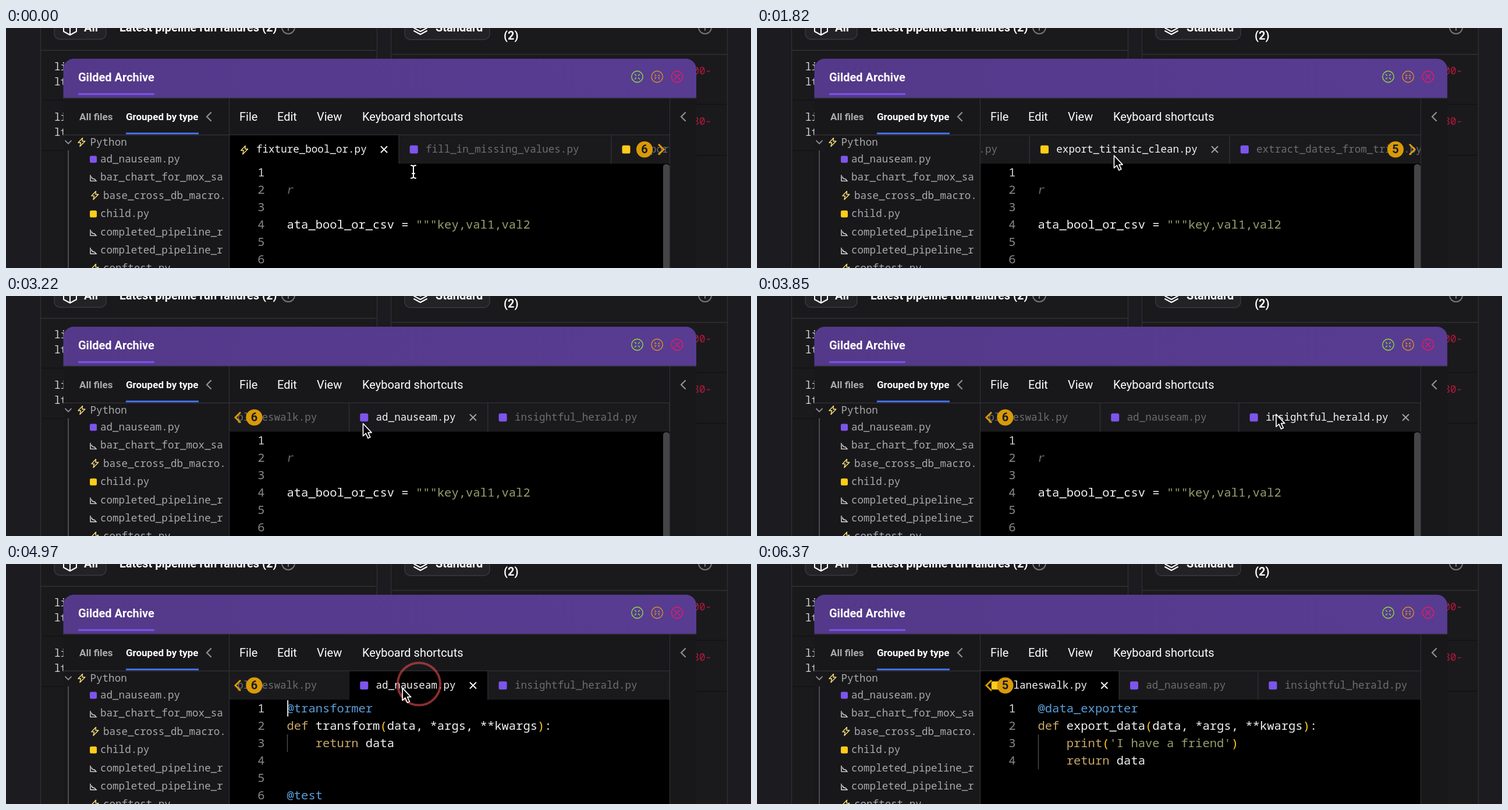
Recreate the animation shown at these times as an HTML page. Size 1280 px wide and 414 px high, loop 6.44 s.

```html
<!DOCTYPE html>
<html lang="en">
<head>
<meta charset="utf-8">
<title>Editor tabs</title>
<style>
html, body { margin: 0; width: 100%; height: 100%; overflow: hidden; background: #1b1b20; }
svg { display: block; width: 1280px; height: 414px; }
text { font-family: Roboto, sans-serif; font-size: 20px; fill: #fff; white-space: pre; }
.b { font-weight: 700; }
.m { font-family: "Noto Sans Mono", monospace; font-size: 17.57px; }
.code { font-family: "Noto Sans Mono", monospace; font-size: 20.5px; }
.line { fill: none; stroke: #303035; stroke-width: 1.3; }
.ico { fill: none; stroke-width: 1.4; stroke-linejoin: round; stroke-linecap: round; }
</style>
</head>
<body>
<svg id="stage" viewBox="0 0 1280 414">
  <defs>
    <clipPath id="bar"><rect x="384" y="185" width="756" height="49"/></clipPath>
    <clipPath id="side"><rect x="98" y="185" width="285" height="229"/></clipPath>
    <linearGradient id="head"><stop stop-color="#54398a"/><stop offset="1" stop-color="#583c92"/></linearGradient>
    <path id="bolt" class="ico" stroke="#ffe27a" d="M8.500 .8L1 8.800H5.500L4 15.200L12.800 6.200H8Z"/>
    <path id="chart" class="ico" stroke="#e4e4e6" d="M1 2V12H11.500M3 5Q4 8.500 6 8.500Q8.500 8 10 11"/>
  </defs>

  <rect width="1280" height="414" fill="#1b1b20"/>
  <g fill="#1a1a1d" stroke="#303035" stroke-width="1.3">
    <rect x="59.5" y="-20" width="578" height="460"/>
    <rect x="661.5" y="-20" width="578" height="460"/>
    <path d="M60 38.5H637M662 45.5H1239"/>
    <path d="M62 124.5H100M62 211.5H100M1186 131.5H1238M1186 219.5H1238" stroke="#111113"/>
    <rect x="83" y="-25" width="89" height="44.5" rx="10" fill="#232327" stroke="#3a3a3f"/>
    <rect x="685" y="-25" width="146" height="45" rx="10" fill="#232327" stroke="#3a3a3f"/>
  </g>
  <g class="ico" stroke="#fff" style="stroke-width:2">
    <path d="M110 -12L121 -6V6L110 12L99 6V-6ZM110 12V0M99 -6L110 0L121 -6"/>
    <path d="M712 -12L723 -6L712 0L701 -6ZM701 0L712 6L723 0M701 5L712 11L723 5"/>
    <g stroke="#77777b"><circle cx="485" cy="-1" r="11"/><path d="M485 -2V4"/><circle cx="1201" cy="-1" r="11"/><path d="M1201 -2V4"/></g>
  </g>
  <text class="b" x="134" y="6">All</text>
  <text class="b" x="195" y="6">Latest pipeline run failures (2)</text>
  <text class="b" x="738" y="6">Standard</text>
  <text class="b" x="855" y="20">(2)</text>
  <g id="rows"></g>

  <path d="M98.500 414V71Q98.500 53 116.500 53H1168Q1186 53 1186 71V414Z" fill="#18181b"/>
  <path d="M98.500 121V71A18 18 0 0 1 116.500 53H1168A18 18 0 0 1 1186 71V121Z" fill="url(#head)"/>
  <text class="b" x="124" y="91.500">Gilded Archive</text>
  <rect x="124" y="112.500" width="131" height="3" rx="1" fill="#7d55ec"/>
  <g class="ico">
    <g stroke="#8fdc3c"><circle cx="1084.500" cy="84" r="9.700"/><path d="M1080.500 80L1082.500 82M1088.500 80L1086.500 82M1080.500 88L1082.500 86M1088.500 88L1086.500 86"/></g>
    <g stroke="#d3922a"><circle cx="1118.700" cy="84" r="9.700"/><path d="M1115 80L1117 82.500H1114.500M1122.500 80L1120.500 82.500H1123M1115 88L1117 85.500H1114.500M1122.500 88L1120.500 85.500H1123" stroke-width="1.200"/></g>
    <g stroke="#f0195f"><circle cx="1153" cy="84" r="9.700"/><path d="M1149 80L1157 88M1157 80L1149 88"/></g>
  </g>
  <path class="line" d="M98 121H1186M98 184.500H384M384 184.500H1140"/>
  <text class="b" x="126" y="158.600" style="font-size:17px;fill:#aaaaad">All files</text>
  <text class="b" x="206" y="158.600" style="font-size:17px">Grouped by type</text>
  <rect x="206" y="180.500" width="125" height="2.800" fill="#4877ff"/>
  <g class="ico" stroke="#8c8c90" style="stroke-width:2.400">
    <path d="M352 146L345 153L352 160M1167 146L1160 153L1167 160"/>
    <path d="M102 194.500L107 199.500L112 194.500" style="stroke-width:1.800"/>
  </g>
  <text x="401" y="160">File</text>
  <text x="466" y="160">Edit</text>
  <text x="534" y="160">View</text>
  <text x="612" y="160">Keyboard shortcuts</text>
  <g id="tree" clip-path="url(#side)"></g>

  <rect x="384" y="185" width="756" height="49" fill="#1a1a1d"/>
  <rect x="384" y="234" width="756" height="180" fill="#000"/>
  <g id="tabs" clip-path="url(#bar)"></g>
  <g id="badge">
    <path id="arrow" class="ico" stroke="#d99a08" style="stroke-width:3;stroke-linecap:butt;stroke-linejoin:miter"/>
    <circle id="disc" cy="209.500" r="14" fill="#d99a08"/>
    <text id="count" class="b" y="216" text-anchor="middle" style="fill:#1b1b1e">6</text>
  </g>
  <g id="docs"></g>
  <path class="line" d="M383.500 121V414M1140.500 121V414"/>
  <circle id="ring" fill="none" stroke="#d9484c" stroke-width="4"/>
  <g id="pointer">
    <path id="hand" d="M0 0V21.500L4.800 17L8.600 25.300L12.300 23.600L8.600 15.600H14.600Z" fill="#000" stroke="#fff" stroke-width="1.700" stroke-linejoin="round"/>
    <g id="beam" fill="none" stroke-linecap="round">
      <path d="M-4 -11Q0 -11 0 -8Q0 -11 4 -11M0 -8V8M-4 11Q0 11 0 8Q0 11 4 11M-2 3H2" stroke="#000" stroke-width="4.500"/>
      <path d="M-4 -11Q0 -11 0 -8Q0 -11 4 -11M0 -8V8M-4 11Q0 11 0 8Q0 11 4 11M-2 3H2" stroke="#fff" stroke-width="2"/>
    </g>
  </g>
</svg>
<script>
const LOOP = 6440, LEFT = 384, VIEW = 756, CH = 10.54;
const PURPLE = '#7d55ec', YELLOW = '#ffcc19', BLUE = '#4877ff';
const $ = id => document.getElementById(id);

function add(parent, tag, attrs = {}, text) {
  const el = document.createElementNS('http://www.w3.org/2000/svg', tag);
  for (const k in attrs) el.setAttribute(k, attrs[k]);
  if (text != null) el.textContent = text;
  return parent.appendChild(el);
}

function icon(parent, kind, x, y, size) {
  if (kind[0] === '#')
    return add(parent, 'rect', { x, y, width: size, height: size, rx: 2.5, fill: kind });
  return add(parent, 'use', { href: '#' + kind, x, y });
}

// Log rows behind the window
const rows = $('rows');
[['li', 73], ['lt', 98.5], ['li', 160], ['lt', 185.5]].forEach(([s, y]) =>
  add(rows, 'text', { class: 'm', x: 83, y, style: 'fill:#d8d8da' }, s));
[['00-', 80], ['80-', 167]].forEach(([s, y]) =>
  add(rows, 'text', { class: 'm', x: 1212, y, 'text-anchor': 'end', style: 'fill:#b8183c' }, s));

// File tree
const tree = $('tree');
add(tree, 'path', { class: 'line', d: 'M107 211V414', style: 'stroke:#6a6a6e' });
icon(tree, 'bolt', 123, 189);
const label = (x, y, s) => add(tree, 'text', { class: 'm', x, y, style: 'fill:#a9a9ac' }, s);
label(144.5, 203, 'Python');
[
  [PURPLE, 'ad_nauseam.py'], ['chart', 'bar_chart_for_mox_sa'], ['bolt', 'base_cross_db_macro.'],
  [YELLOW, 'child.py'], ['chart', 'completed_pipeline_r'], ['chart', 'completed_pipeline_r'],
  ['bolt', 'conftest.py']
].forEach(([kind, name], i) => {
  const y = 232 + 31.4 * i, bolt = kind === 'bolt';
  icon(tree, kind, bolt ? 146 : 144, y - (bolt ? 14 : 11.5), 12);
  label(bolt ? 167 : 162, y, name);
});

// Tabs
let edge = 0;
const tabs = [
  ['fixture_bool_or.py', 'bolt'], ['fill_in_missing_values.py', PURPLE],
  ['export_titanic_clean.py', YELLOW], ['extract_dates_from_trips.py', PURPLE],
  ['dynamic_parent.py', BLUE], ['planeswalk.py', YELLOW],
  ['ad_nauseam.py', PURPLE], ['insightful_herald.py', PURPLE]
].map(([name, kind]) => {
  const width = name.length * CH + 101.3, start = edge;
  edge += width;
  const g = add($('tabs'), 'g');
  const fill = add(g, 'rect', { y: 185, width, height: 49 });
  const rule = add(g, 'path', { class: 'line', d: `M0 185V234M${width} 185V234` });
  icon(g, kind, 18.7, 202.5, 14);
  const text = add(g, 'text', { class: 'm', x: 46, y: 215 }, name);
  const cross = add(g, 'path', {
    class: 'ico', style: 'stroke-width:1.8',
    d: `M${width - 30.5} 204.5l10 10m0 -10l-10 10`
  });
  return { start, end: edge, g, fill, rule, text, cross };
});
const MAX = edge - VIEW;

// Code documents: each line is a list of [colour, text]
const W = '#f2f2f2', D = '#c9a868', P = '#ffcb2b', A = '#5a9fdb', S = '#9b9e6c';
const sources = [
  [[], [['#6b6b6e', 'r']], [], [[W, 'ata_bool_or_csv = '], [S, '"""key,val1,val2']], [], []],
  [[[A, '@transformer']],
   [[D, 'def '], [W, 'transform'], [P, '('], [W, 'data, *args, **kwargs'], [P, ')'], [W, ':']],
   [[D, '    return '], [W, 'data']], [], [], [[A, '@test']]],
  [[[A, '@data_exporter']],
   [[D, 'def '], [W, 'export_data'], [P, '('], [W, 'data, *args, **kwargs'], [P, ')'], [W, ':']],
   [[D, '    print'], [P, '('], [S, "'I have a friend'"], [P, ')']],
   [[D, '    return '], [W, 'data']]]
];
const docs = sources.map((lines, n) => {
  const g = add($('docs'), 'g');
  lines.forEach((parts, i) => {
    const y = 256 + 30 * i;
    add(g, 'text', { class: 'code', x: 444.5, y, 'text-anchor': 'end',
      style: `fill:${i ? '#88888b' : '#d0d0d2'}` }, i + 1);
    const row = add(g, 'text', { class: 'code', x: 482.5, y });
    parts.forEach(([c, s]) => add(row, 'tspan', {
      style: `fill:${c}` + (s === 'r' ? ';font-style:italic;font-family:"Liberation Mono",monospace' : '')
    }, s));
  });
  if (n) add(g, 'path', { class: 'line', d: `M483.5 294V${n === 1 ? 324 : 354}`, style: 'stroke:#505054' });
  else add(g, 'path', { d: 'M1129 414V240Q1129 235 1134.500 235Q1140 235 1140 240V414Z', fill: '#454547' });
  return g;
});
const caret = add(docs[1], 'rect', { x: 483, y: 235, width: 2.2, height: 28, fill: '#d0d0d2' });

// Motion
const clamp = v => Math.max(0, Math.min(1, v));
const ease = p => p < .5 ? 2 * p * p : 1 - 2 * (1 - p) * (1 - p);
const part = (t, a, b) => clamp((t - a) / (b - a));

function track(t, start, moves) {
  let v = start;
  for (const [a, b, to] of moves) v += (to - v) * ease(part(t, a, b));
  return v;
}

const scrollAt = t => track(t, 0, [
  [840, 1470, 571.5], [1820, 2520, 1296.5], [2660, 3220, MAX], [5600, 6020, tabs[5].start]
]);
const pointerX = t => track(t, 700, [
  [30, 300, 626], [470, 560, 613.5], [3330, 3850, 892], [4030, 4690, 709], [4825, 5390, 500]
]);
const pointerY = t => track(t, 248, [
  [30, 300, 214], [470, 560, 220], [3330, 3850, 204], [4030, 4690, 207], [4700, 5000, 214]
]);
const CLICKS = [[4760, 709.5, 207], [5530, 500, 214]];

// Hover only refreshes once a swipe has settled
const hoverScroll = t => t < 1500 ? 0 : t < 2500 ? 571.5 : t < 3200 ? 1296.5 : scrollAt(t);

function draw(t) {
  const scroll = scrollAt(t), x = pointerX(t), y = pointerY(t);
  const active = t < 4800 ? 0 : t < 5580 ? 6 : 5;
  const at = x - LEFT + hoverScroll(t);

  tabs.forEach((tab, i) => {
    const on = i === active;
    const hover = y < 234 && at >= tab.start && at < tab.end;
    tab.g.setAttribute('transform', `translate(${LEFT + tab.start - scroll} 0)`);
    tab.fill.setAttribute('fill', on ? '#000' : '#1a1a1d');
    tab.rule.style.display = on ? 'none' : '';
    tab.text.style.fill = on || hover ? '#f4f4f5' : '#6d6d70';
    tab.cross.style.display = on || hover ? '' : 'none';
    tab.cross.style.stroke = on ? '#fff' : '#a5a5a8';
  });

  const back = scroll > MAX / 2;
  const hidden = tabs.filter(b => back ? b.start < scroll - 2 : b.end > scroll + VIEW + 2).length;
  const cx = back ? 426.5 : 1097;
  $('arrow').setAttribute('d', back ? 'M403 200.500L394 209.500L403 218.500' : 'M1121 200.500L1130 209.500L1121 218.500');
  $('disc').setAttribute('cx', cx);
  $('count').setAttribute('x', cx);
  $('count').textContent = hidden;

  const doc = active === 0 ? 0 : active === 6 ? 1 : 2;
  docs.forEach((g, i) => g.style.display = i === doc ? '' : 'none');
  caret.style.display = t < 5320 ? '' : 'none';

  const ring = $('ring');
  const click = CLICKS.find(c => t >= c[0] && t < c[0] + 350);
  ring.style.display = click ? '' : 'none';
  if (click) {
    const p = (t - click[0]) / 350;
    ring.setAttribute('cx', click[1]);
    ring.setAttribute('cy', click[2]);
    ring.setAttribute('r', 10 + 31.5 * (1 - (1 - p) * (1 - p)));
    ring.setAttribute('opacity', 1 - p * p);
  }

  const beam = y >= 234;
  $('pointer').setAttribute('transform', `translate(${x} ${y})`);
  $('pointer').setAttribute('opacity', 1 - part(t, 6160, 6360));
  $('hand').style.display = beam ? 'none' : '';
  $('beam').style.display = beam ? '' : 'none';
}

const t0 = performance.now();
function tick(now) {
  draw(Math.max(0, now - t0) % LOOP);
  requestAnimationFrame(tick);
}
draw(0);
requestAnimationFrame(tick);
</script>
</body>
</html>
```
